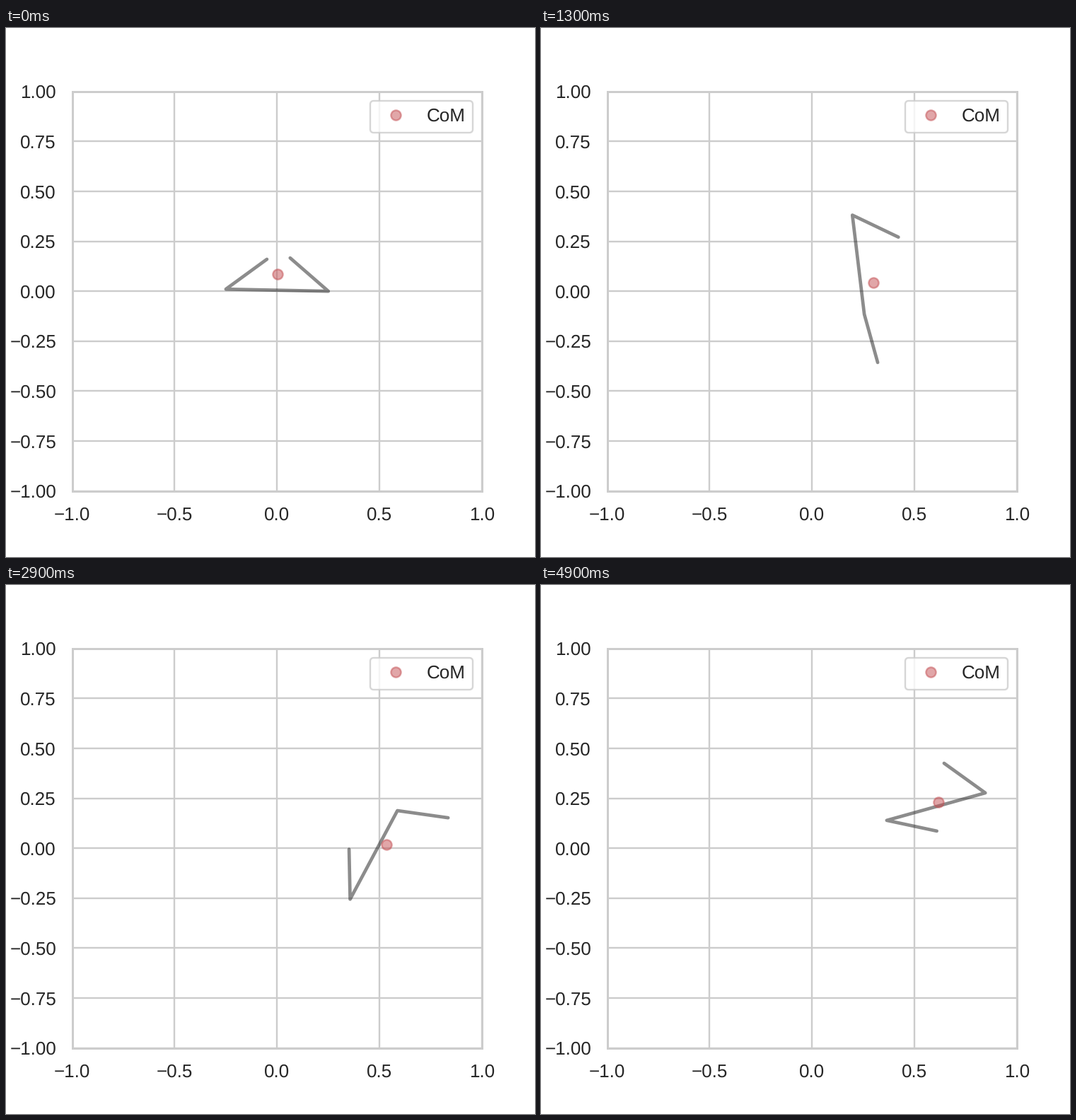
A matplotlib script that plays this animation: 748 by 748 pixels, repeating every 5000 ms.

```python
import numpy as np
import matplotlib.pyplot as plt
from matplotlib.animation import FuncAnimation

FRAMES, INTERVAL = 50, 100
BODY, ARM = 0.5, 0.25
GREY, INK, RED = "0.8", "0.15", "#C44E52"


def bend(t, at, soft=0.1):
    """Smooth ramp: zero before `at`, then rising by one per second."""
    return soft * np.logaddexp(0, (t - at) / soft)


# Every part drifts at a steady speed that bends softly at a few moments.
def middle(t):
    x = 0.138 * t + 0.066 * bend(t, 0.6) - 0.07 * bend(t, 1.75) - 0.18 * bend(t, 4.15)
    y = (0.005 + 0.2 * t - 0.21 * bend(t, 0.67) - 0.14 * bend(t, 1.77)
         + 0.35 * bend(t, 3.33, 0.2))
    return np.array([x, y])


def body_angle(t):
    return (-1.2 - 72 * t + 20 * bend(t, 0.75) + 133 * bend(t, 2.63, 0.3)
            - 22 * bend(t, 4.22))


def back_arm_angle(t):
    return 36.8 - 48.5 * t + 229.5 * bend(t, 2.51, 0.2)


def front_arm_angle(t):
    return (138.2 - 158 * t - 17 * bend(t, 0.85) + 153 * bend(t, 2.354, 0.05)
            + 72 * bend(t, 3.53, 0.3))


def ray(degrees, length):
    a = np.radians(degrees)
    return length * np.array([np.cos(a), np.sin(a)])


def joints(t):
    centre, half = middle(t), ray(body_angle(t), BODY / 2)
    back, front = centre - half, centre + half
    return np.array([back + ray(back_arm_angle(t), ARM), back,
                     front, front + ray(front_arm_angle(t), ARM)])


plt.rcParams.update({
    "font.family": "Liberation Sans", "font.size": 11, "text.hinting": "none",
    "axes.edgecolor": GREY, "axes.linewidth": 1.25, "axes.axisbelow": True,
    "grid.color": GREY, "grid.linewidth": 1,
    "text.color": INK, "xtick.color": INK, "ytick.color": INK,
    "xtick.bottom": False, "ytick.left": False,
    "xtick.major.size": 6, "ytick.major.size": 6,
    "lines.solid_capstyle": "round", "patch.linewidth": 1,
})

fig = plt.figure(figsize=(4.4, 4.4), dpi=170, facecolor="white")
ax = fig.add_axes([0.125, 0.125, 0.775, 0.755])
ax.set(xlim=(-1, 1), ylim=(-1, 1),
       xticks=np.linspace(-1, 1, 5), yticks=np.linspace(-1, 1, 9))
ax.grid(True)

links, = ax.plot([], [], color=(0.1, 0.1, 0.1), lw=2, alpha=0.5)
com, = ax.plot([], [], "o", color=RED, ms=6, alpha=0.5, label="CoM")
ax.legend(loc="upper right", edgecolor=GREY, framealpha=0.8, handletextpad=0.68)


def draw(frame):
    points = joints(frame * INTERVAL / 1000)
    links.set_data(*points.T)
    com.set_data(*points.mean(axis=0)[:, None])
    return links, com


animation = FuncAnimation(fig, draw, frames=FRAMES, interval=INTERVAL,
                          repeat=True, repeat_delay=0)
plt.show()
```
